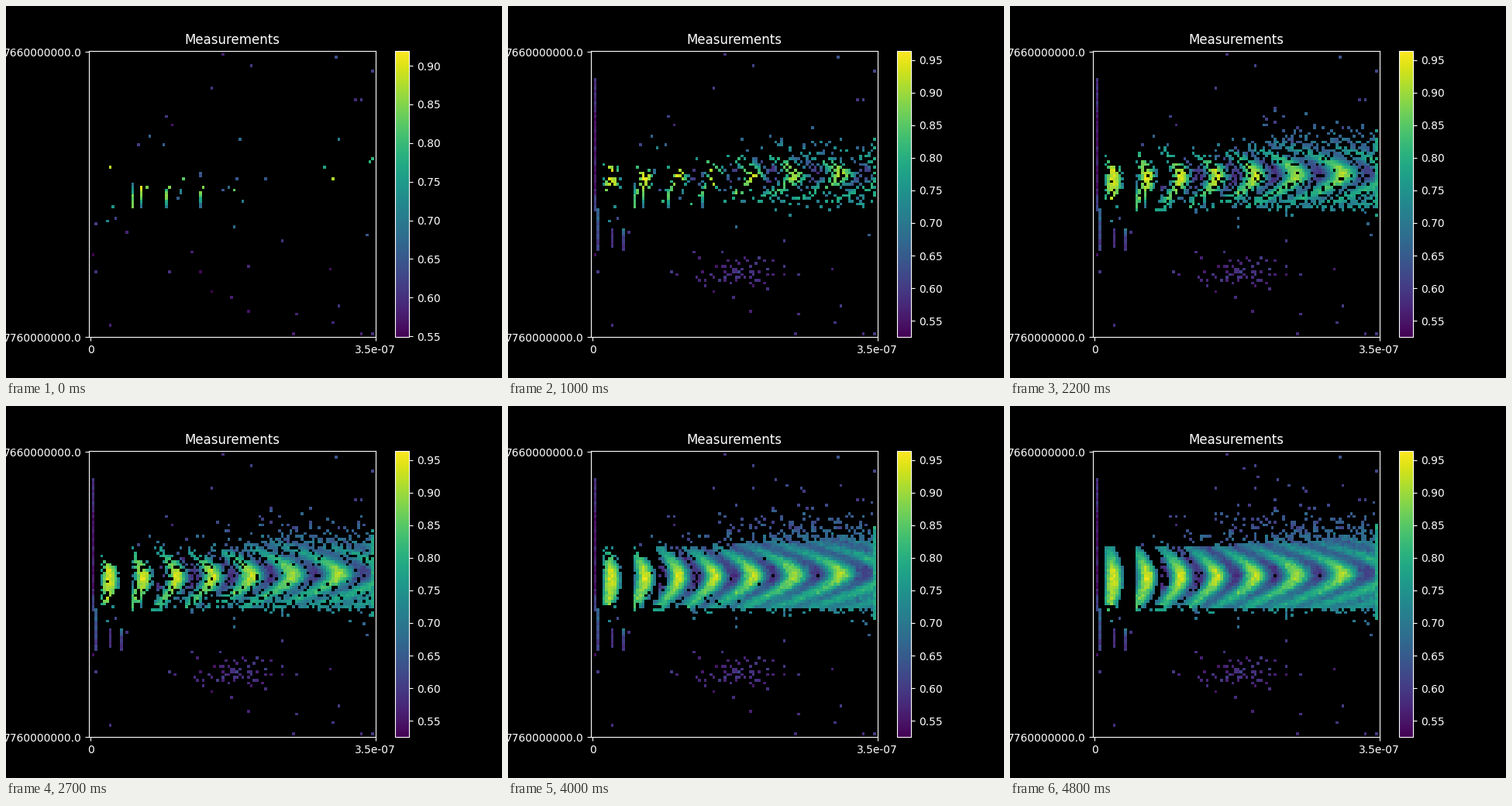
These frames come from a looping animation (640x480 px, 4.9 s). A matplotlib script:

```python
import numpy as np
import matplotlib.pyplot as plt
from matplotlib.animation import FuncAnimation

plt.style.use("dark_background")

N, FRAMES = 101, 49
WIDTH = 13  # resonance half-width in rows
rng = np.random.default_rng(11)
row, col = np.mgrid[0:N, 0:N]
offset = row - (45 - col / 50)  # rows below the resonance
edge = (col == N - 1) & (row >= 26) & (row <= 59)


def make_field():
    """Damped chevron oscillation around the resonance, with noise."""
    d = offset / WIDTH
    k = np.arange(-1, 16)
    fringes = 6.9 + 11.7 * k + 0.05 * k**3
    cycles = np.interp(col * np.sqrt(1 + d**2), fringes, k)
    swing = (0.2 - col / 2000) / (1 + d**2 * (1 + col / 15))
    falloff = np.where(d < 0, np.exp(-1.2 * d**2), np.exp(-0.35 * d**4))
    floor = 0.60 + 0.04 * col / N - 0.04 * (d > 2)
    v = floor + (0.75 - floor) * falloff + swing * np.cos(2 * np.pi * cycles)
    v = np.where(edge, 0.78, v) + rng.normal(0, 0.015, v.shape)
    return np.clip(v, 0.525, 0.964)


def make_order(v):
    """Order, 0 to 1 within each column, in which cells are measured."""
    outside = np.where(offset < 0, -offset - 11, offset - 9.5 - col / 30)
    spread = np.where(offset < 0, np.clip((col - 20) / 60, 0, 0.9), 0.5)
    reach = np.where(offset < 0, 5, 1.2)
    chance = np.where(outside <= 0, 1, spread * np.exp(-outside / reach))

    # Early columns keep only the bright fringes, later ones fill up
    dim = np.where(col < 24, 0, np.clip(0.5 + (col - 24) / 40, 0, 1))
    chance = chance * np.where(v > 0.68, 1, dim) * np.where(v < 0.58, 0.8, 1)
    chance[(col < 4) | ((col > 10) & (col < 15))] = 0
    chance[:, -1] = edge[:, -1]

    jitter = np.clip(0.3 + col / 70, 0, 1)
    score = (jitter * rng.random(v.shape) + (1.3 - jitter) * (0.95 - v) / 0.4
             + 0.35 * abs(offset) / WIDTH)
    inside = rng.random(v.shape) < chance
    score[~inside] = np.inf
    rank = score.argsort(axis=0).argsort(axis=0)
    return np.where(inside, rank / np.maximum(inside.sum(axis=0), 1), 2)


def make_births():
    """Frame at which the surveyed and scanned cells appear."""
    born = np.full((N, N), FRAMES)

    def place(x, y, when):
        x, y = (np.clip(np.rint(a), 0, N - 1).astype(int) for a in (x, y))
        born[y, x] = when

    # Loose cluster far below the resonance
    place(rng.normal(54, 8, 60), rng.normal(78, 2.5, 60), rng.integers(1, 6, 60))
    # Long column scans: column, first row, last row
    scans = [(1, 10, 56), (2, 56, 70), (7, 63, 69), (11, 63, 70)]
    for when, (x, top, bottom) in enumerate(scans, 1):
        born[top:bottom + 1, x] = when
    # Opening survey: scattered points, then the lower flanks of the fringes
    place(rng.uniform(0, N, 45), rng.uniform(0, N, 45), 0)
    place(rng.uniform(25, 62, 14), rng.normal(48, 2.5, 14), 0)
    for x in (15, 18, 27, 39):
        born[46 + x // 8:56, x] = 0
    return born


def measured_share(i):
    """Share of each column measured by step i; the right side leads."""
    s = np.clip((i - 4) / (FRAMES - 5), 0, 1)
    x = np.arange(N)
    lead = np.clip((x - 45) / 20, 0, 1)
    middle = s * s * (3 - 2 * s)
    left = np.where(x < 24, s, middle)
    return left + ((1 - (1 - s)**2) - left) * lead


field = make_field()
order = make_order(field)
born = make_births()

fig, ax = plt.subplots(figsize=(6.4, 4.8), dpi=100)
image = ax.imshow(np.full((N, N), np.nan), cmap="viridis",
                  vmin=0.549, vmax=0.9195, interpolation="nearest")
fig.colorbar(image, ax=ax)
ax.set_title("Measurements")
ax.set_xticks([0, N], ["0", "3.5e-07"])
ax.set_yticks([0, N], ["7660000000.0", "7760000000.0"])
ax.set_xlim(-0.5, N)
ax.set_ylim(N, -0.5)


def update(i):
    seen = (born <= i) | (order < measured_share(i))
    image.set_data(np.where(seen, field, np.nan))
    image.set_clim(0.549 if i < 3 else 0.525, 0.9195 if i < 2 else 0.9643)
    return [image]


anim = FuncAnimation(fig, update, frames=FRAMES, interval=100,
                     repeat=True, repeat_delay=0, blit=False)
plt.show()
```
